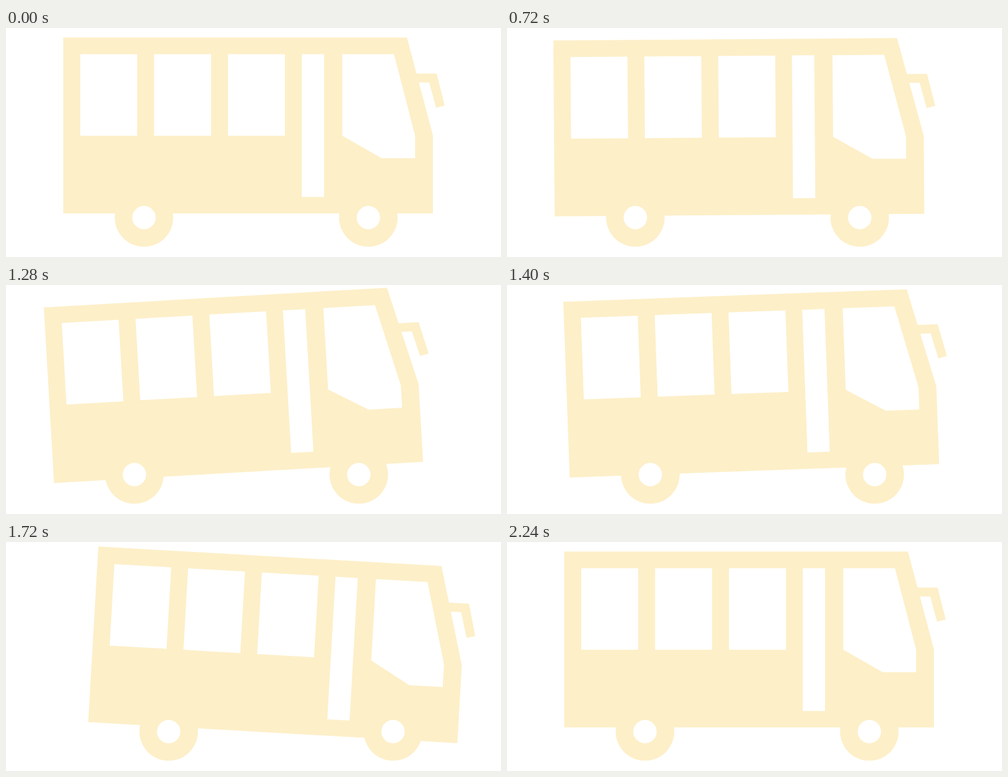
Write an HTML page that moves like this. It is 800 by 372 pixels and loops after 3.04 s.

```html
<!DOCTYPE html>
<html lang="en">
<head>
<meta charset="utf-8">
<title>Rocking bus</title>
<style>
  html, body { margin: 0; width: 100%; height: 100%; overflow: hidden; background: #fff; }
  svg { display: block; width: 100vw; height: 100vh; }
</style>
</head>
<body>
<svg viewBox="0 0 800 372" fill="#fdefc8">
  <defs>
    <path id="window" fill="#fff" d="M120 42.5h92v132.6h-92z"/>
    <g id="wheel">
      <circle r="47.3"/>
      <circle r="18.9" fill="#fff"/>
    </g>
  </defs>
  <g id="bus">
    <g id="body">
      <path d="M92.5 15.4H648L690 174.5V301.2H92.5Z"/>
      <path d="M660 74H696L709 126L695 129.5L684 88.5H660Z"/>
      <use href="#window"/>
      <use href="#window" x="119.4"/>
      <use href="#window" x="238.8"/>
      <path fill="#fff" d="M478 42.5h36v232h-36z"/>
      <path fill="#fff" d="M543.5 42.5H627L661.2 175V211.4H607L543.5 175.1Z"/>
    </g>
    <use href="#wheel" x="223" y="308"/>
    <use href="#wheel" x="585.6" y="308"/>
  </g>
</svg>
<script>
const LOOP = 3040, STEP = 40;
const PIVOT = "391.25 301";
const bus = document.getElementById("bus");
const body = document.getElementById("body");

// Smoothstep; skew below 1 starts briskly, above 1 starts late.
function ease(t, skew) {
  const u = t ** skew;
  return u * u * (3 - 2 * u);
}

// Eases from pose to pose, beginning at rest.
function track(begin, ...poses) {
  return time => {
    let from = begin, value = 0;
    for (const { at, to, skew = 1 } of poses) {
      const t = Math.min(1, Math.max(0, (time - from) / (at - from)));
      value += (to - value) * ease(t, skew);
      from = at;
    }
    return value;
  };
}

// Back up, lunge forward, roll back to rest.
const drive = track(565,
  { at: 1120, to: -34.7, skew: 0.6 },
  { at: 1685, to: 44.5, skew: 0.9 },
  { at: 2200, to: 0, skew: 0.6 });

// The body dips at each end of the ride.
const sink = track(0,
  { at: 1120, to: 7.35, skew: 2 },
  { at: 1400, to: 0.7 },
  { at: 1720, to: 8.5 },
  { at: 2200, to: 0, skew: 0.9 });

// It leans against the movement a little late.
const tilt = track(560,
  { at: 1280, to: -3.3 },
  { at: 1720, to: 3.28 },
  { at: 2200, to: 0 });

function draw(time) {
  const t = Math.floor(time % LOOP / STEP) * STEP;
  bus.setAttribute("transform", `translate(${drive(t)} 0)`);
  body.setAttribute("transform", `translate(0 ${sink(t)}) rotate(${tilt(t)} ${PIVOT})`);
}

const start = performance.now();
function tick() {
  draw(performance.now() - start);
  requestAnimationFrame(tick);
}
tick();
</script>
</body>
</html>
```
